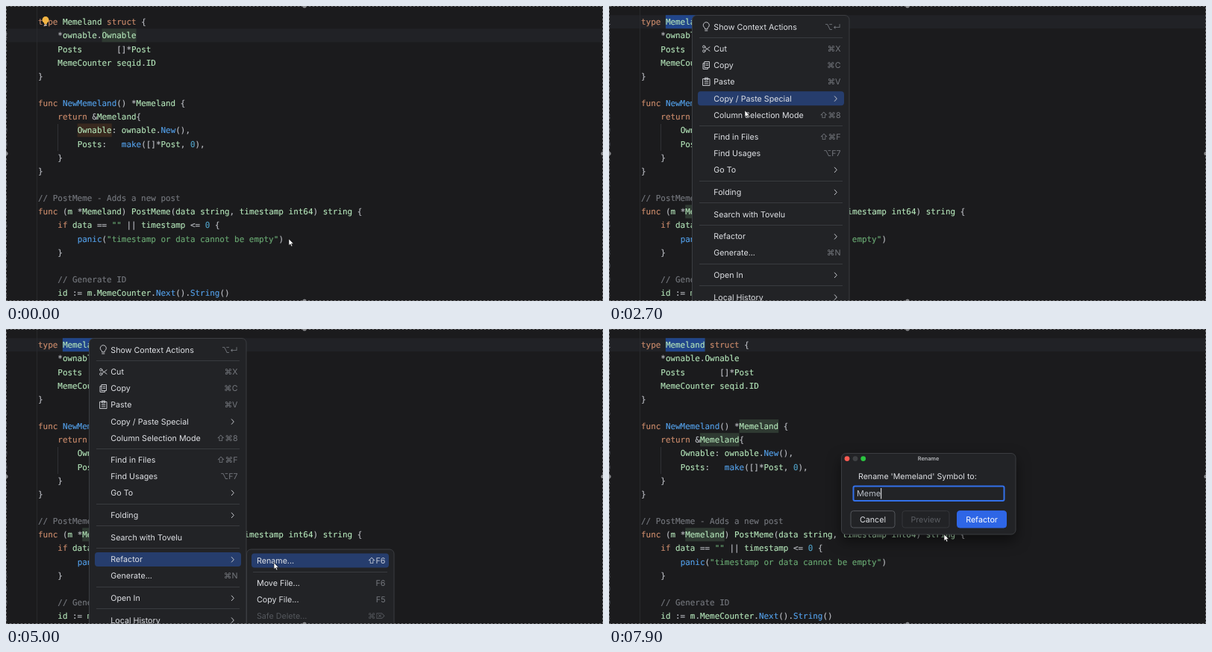
Animation, 800 px wide and 395 px high, one loop 8000 ms. Source, as an HTML page:

```html
<!DOCTYPE html>
<html lang="en">
<head>
<meta charset="utf-8">
<title>Rename refactoring</title>
<style>
  html, body { margin: 0; width: 100%; height: 100%; overflow: hidden; background: #1b1b1d; }
  svg { display: block; width: 800px; height: 395px; }
  text { white-space: pre; text-rendering: geometricPrecision; }
  .code { font: 10.93px "DejaVu Sans Mono", "Noto Sans Mono", monospace; stroke-width: .15; }
  .ui { font: 10.7px Inter, "DejaVu Sans", sans-serif; fill: #dfe1e5; }
  .title { font-size: 7.3px; font-weight: 600; fill: #b4b6ba; }
  .icon { fill: none; stroke: #c6c8cd; stroke-width: 1; stroke-linecap: round; stroke-linejoin: round; }
  .floating { filter: drop-shadow(0 8px 9px rgba(0, 0, 0, .5)); }
</style>
</head>
<body>
<svg id="stage" viewBox="0 0 800 395"></svg>
<script>
const DURATION = 8000, STEP = 100;
const CHAR = 6.58, LEFT = 43, TOP = 21.2, LINE = 18.15;
const COLORS = {
  comment: '#74777d', string: '#69a872', keyword: '#cb8b6b', number: '#4f9fc4',
  call: '#539fe8', name: '#b3e4b8', plain: '#babcc2'
};
const LINES = `type Memeland struct {
    *ownable.Ownable
    Posts       []*Post
    MemeCounter seqid.ID
}

func NewMemeland() *Memeland {
    return &Memeland{
        Ownable: ownable.New(),
        Posts:   make([]*Post, 0),
    }
}

// PostMeme - Adds a new post
func (m *Memeland) PostMeme(data string, timestamp int64) string {
    if data == "" || timestamp <= 0 {
        panic("timestamp or data cannot be empty")
    }

    // Generate ID
    id := m.MemeCounter.Next().String()`.split('\n');

const stage = document.getElementById('stage');
function add(parent, tag, attrs = {}, content) {
  const node = document.createElementNS('http://www.w3.org/2000/svg', tag);
  for (const key in attrs) node.setAttribute(key, attrs[key]);
  if (content !== undefined) node.textContent = content;
  return parent.appendChild(node);
}
const group = (parent = stage) => add(parent, 'g');
const rect = (parent, x, y, width, height, fill, extra) =>
  add(parent, 'rect', { x, y, width, height, fill, ...extra });
const line = (parent, x1, y1, x2, y2, stroke) =>
  add(parent, 'line', { x1, y1, x2, y2, stroke });
const circle = (parent, cx, cy, r, fill) => add(parent, 'circle', { cx, cy, r, fill });
const path = (parent, d, extra) => add(parent, 'path', { d, class: 'icon', ...extra });
const label = (parent, x, y, content, extra) =>
  add(parent, 'text', { x, y: y + 3.9, class: 'ui', ...extra }, content);
const show = (node, on) => node.setAttribute('visibility', on ? 'inherit' : 'hidden');
const rowY = row => TOP + row * LINE;
const colX = col => LEFT + col * CHAR;
const mark = (parent, row, col, length, fill) =>
  rect(parent, colX(col), rowY(row) - 9, length * CHAR, 18, fill);

// Editor
const SELECTED = '#21458a', USAGE = '#2f3a32';
rect(stage, 0, 0, 800, 395, '#1b1b1d');
const activeRow = rect(stage, 0, 0, 800, 18, '#212226');
line(stage, 41.5, 0, 41.5, 395, '#28292c');
line(stage, 69.5, 158, 69.5, 194, '#303135');

const ownableMarks = group();
mark(ownableMarks, 1, 13, 7, USAGE);
mark(ownableMarks, 8, 8, 7, '#39291f');
const usageMarks = group();
[[0, 5], [6, 20], [7, 12], [14, 9]].forEach(([row, col]) => mark(usageMarks, row, col, 8, USAGE));
const selection = mark(stage, 0, 5, 8, SELECTED);

const TOKEN = /(?<comment>\/\/.*)|(?<string>"[^"]*")|(?<keyword>\b(?:type|struct|func|return|if)\b)|(?<number>\b\d+\b)|(?<call>\b(?:NewMemeland|New|make|panic|Next|String)(?=\())|(?<name>[A-Za-z]\w*)|(?<plain>[^\sA-Za-z0-9"]+?(?=\/\/|[\sA-Za-z0-9"]|$))/g;
const rowNumbers = LINES.map((source, row) => {
  const y = rowY(row) + 4;
  for (const match of source.matchAll(TOKEN)) {
    const kind = Object.keys(COLORS).find(key => match.groups[key] !== undefined);
    const color = COLORS[kind];
    add(stage, 'text', { x: colX(match.index), y, class: 'code', fill: color, stroke: color }, match[0]);
  }
  return add(stage, 'text', { x: 2.4, y, class: 'code', 'text-anchor': 'end' }, (row + 1) % 10);
});
const editorCaret = rect(stage, 108.4, 13, 1.2, 17, '#d5d7db');

const bulb = group();
circle(bulb, 53, 18.6, 4.5, '#f2b443');
rect(bulb, 51, 22, 4, 2.2, '#f2b443');
rect(bulb, 51.2, 25, 3.6, 1.4, '#c9cbd0');

// Context menu and submenu
const ACCENT = '#263d6d', PANEL = '#222326', RULE = '#393b3f';
function panel(parent, x, y, width, height, extra) {
  rect(parent, x, y, width, height, PANEL, { rx: 6, stroke: '#3b3d41', ...extra });
}
function chevron(parent, y) {
  path(parent, `M302.3 ${y - 2.9}l3 3.3l-3 3.3`, { stroke: '#a9abb0' });
}
const MENU = [
  [28, 'Show Context Actions', '⌥↵'], [57.5, 'Cut', '⌘X'], [79.5, 'Copy', '⌘C'],
  [101.5, 'Paste', '⌘V'], [123.7, 'Copy / Paste Special', '>'],
  [145.6, 'Column Selection Mode', '⇧⌘8'], [175, 'Find in Files', '⇧⌘F'],
  [197, 'Find Usages', '⌥F7'], [219, 'Go To', '>'], [249, 'Folding', '>'],
  [278.6, 'Search with Tovelu'], [308.4, 'Refactor', '>'], [330, 'Generate...', '⌘N'],
  [360, 'Open In', '>'], [389.6, 'Local History', '>']
];
const menu = group();
panel(menu, 111.5, 12.5, 210.5, 400);
const menuHover = rect(menu, 119, 0, 196, 19, ACCENT, { rx: 4 });
[42.5, 160.5, 234.5, 263.5, 293.5, 345.5, 374.5].forEach(y => line(menu, 121, y, 313, y, RULE));
for (const [y, name, hint] of MENU) {
  label(menu, 140.3, y, name);
  if (hint === '>') chevron(menu, y);
  else if (hint) label(menu, 310.5, y, hint, { 'text-anchor': 'end', style: 'fill:#75787e' });
}
path(menu, 'M128.5 30.5v-1.2a4 4 0 1 1 3.6 0v1.2zM128.7 33h3.2');
path(menu, 'M128.6 55.4L135 60.2M128.6 59.6L135 54.8');
for (const y of [54.6, 60.4]) add(menu, 'circle', { cx: 127.2, cy: y, r: 1.6, class: 'icon' });
path(menu, 'M128.3 74.5h6.2v8h-6.2zM128 76.6h-2v7.8h6.4v-1.6M130 77h2.8M130 79.3h2.8');
path(menu, 'M126 97.5h9v9h-9zM128.5 98.8v-2.6h4v2.6zM128.3 101.5h4.4M128.3 104h4.4');

const submenu = group();
panel(submenu, 322.5, 295, 197.5, 120);
const submenuHover = rect(submenu, 329, 300.5, 184, 19, ACCENT, { rx: 4 });
line(submenu, 331, 325.5, 511, 325.5, RULE);
[
  [310, 'Rename...', '⇧F6', '#dfe1e5', '#c5cbd8'], [339.6, 'Move File...', 'F6', '#dfe1e5', '#75787e'],
  [361.6, 'Copy File...', 'F5', '#dfe1e5', '#75787e'], [383.6, 'Safe Delete...', '⌘⌦', '#55585d', '#55585d']
].forEach(([y, name, hint, color, hintColor]) => {
  label(submenu, 336, y, name, { style: `fill:${color}` });
  label(submenu, 508.5, y, hint, { 'text-anchor': 'end', style: `fill:${hintColor}` });
});

// Rename dialog
const dialog = group();
panel(dialog, 311.5, 166.5, 233.5, 108.5, { class: 'floating' });
[[319, '#fb5b52'], [330, '#3f4144'], [340.7, '#2bc440']].forEach(([x, color]) => circle(dialog, x, 173.6, 3.4, color));
add(dialog, 'text', { x: 428, y: 176.2, class: 'ui title', 'text-anchor': 'middle' }, 'Rename');
label(dialog, 334, 197.3, "Rename 'Memeland' Symbol to:", { style: 'font-size:10.62px' });
rect(dialog, 327.5, 210.5, 202, 19.5, PANEL, { rx: 2, stroke: '#3371ea', 'stroke-width': 2 });
const fieldSelection = rect(dialog, 332, 213, 54, 14.5, SELECTED);
const field = label(dialog, 332, 220, 'Memeland', { style: 'fill:#b9bec8;font-size:10.9px' });
const fieldCaret = rect(dialog, 0, 213, 1.1, 14.5, '#e2e4e8');
[
  [324, 59, 'Cancel', 'none', '#53565b', '#dfe1e5'],
  [393, 63, 'Preview', 'none', '#35373b', '#5b5e63'],
  [466.5, 66, 'Refactor', '#2e66e6', '#2e66e6', '#ffffff']
].forEach(([x, width, name, fill, stroke, color]) => {
  rect(dialog, x, 243.6, width, 22.4, fill, { rx: 3.5, stroke });
  label(dialog, x + width / 2, 255.1, name, { 'text-anchor': 'middle', style: `fill:${color}` });
});

// Recording frame
rect(stage, 0.5, 0.5, 799, 394, 'none', { stroke: '#76777a', 'stroke-dasharray': '3 2' });
[[400, 0], [0, 197.5], [800, 197.5], [400, 395]].forEach(([x, y]) => circle(stage, x, y, 2.6, '#8b8c8f'));

const pointer = path(stage, 'M0 0V8.6L2 6.8L3.4 10L4.9 9.3L3.5 6.2H6.2Z',
  { style: 'fill:#fff;stroke:#111;stroke-width:.6' });

const POINTER_PATH = [
  [0, 379, 312], [200, 379, 312], [1000, 111, 12], [1300, 111, 18], [2200, 111, 18],
  [2700, 182, 140], [3300, 245, 309], [4000, 245, 309], [4500, 359, 313],
  [5700, 359, 313], [6600, 449, 275], [DURATION, 449, 275]
];
function pointerAt(time) {
  const next = Math.max(1, POINTER_PATH.findIndex(key => key[0] >= time));
  const [t0, x0, y0] = POINTER_PATH[next - 1], [t1, x1, y1] = POINTER_PATH[next];
  const u = (time - t0) / (t1 - t0), eased = u * u * (3 - 2 * u);
  return { x: x0 + (x1 - x0) * eased, y: y0 + (y1 - y0) * eased };
}

const CLICK = 1300, SELECT = 1900, MENU_OPEN = 2100, SUBMENU_OPEN = 4200;
const MENU_CLOSE = 5200, DIALOG_OPEN = 5300, DESELECT = 6700, ERASE = 7000;

function render(time) {
  const { x, y } = pointerAt(time);
  pointer.setAttribute('transform', `translate(${x} ${y})`);

  const row = time < CLICK ? 1 : 0;
  activeRow.setAttribute('y', rowY(row) - 9);
  rowNumbers.forEach((node, i) => node.setAttribute('fill', i === row ? '#a1a3ab' : '#4b5059'));
  show(bulb, time < CLICK);
  show(ownableMarks, time < CLICK);
  show(usageMarks, time >= CLICK + 200);
  show(editorCaret, time >= CLICK && time < SELECT);
  show(selection, time >= SELECT);

  const menuOpen = time >= MENU_OPEN && time < MENU_CLOSE;
  show(menu, menuOpen);
  show(submenu, menuOpen && time >= SUBMENU_OPEN);
  show(submenuHover, menuOpen && time >= SUBMENU_OPEN && x > 325);
  // The menu highlight trails the pointer by one step.
  const trail = pointerAt(Math.max(0, time - STEP));
  const hovered = MENU.find(([center]) => Math.abs(center - trail.y) < 11);
  show(menuHover, menuOpen && hovered && trail.x > 113);
  if (hovered) menuHover.setAttribute('y', hovered[0] - 9.5);

  show(dialog, time >= DIALOG_OPEN);
  const erased = Math.min(4, Math.max(0, Math.floor((time - ERASE) / 150) + 1));
  const value = 'Memeland'.slice(0, 8 - erased);
  if (field.textContent !== value) field.textContent = value;
  show(fieldSelection, time >= DIALOG_OPEN && time < DESELECT);
  fieldSelection.setAttribute('width', field.getComputedTextLength());
  const caretIndex = time < DESELECT ? 5 : value.length;
  fieldCaret.setAttribute('x', 332 + field.getSubStringLength(0, caretIndex));
}

function tick() {
  render(Math.floor(performance.now() % DURATION / STEP) * STEP);
  requestAnimationFrame(tick);
}
tick();
</script>
</body>
</html>
```
